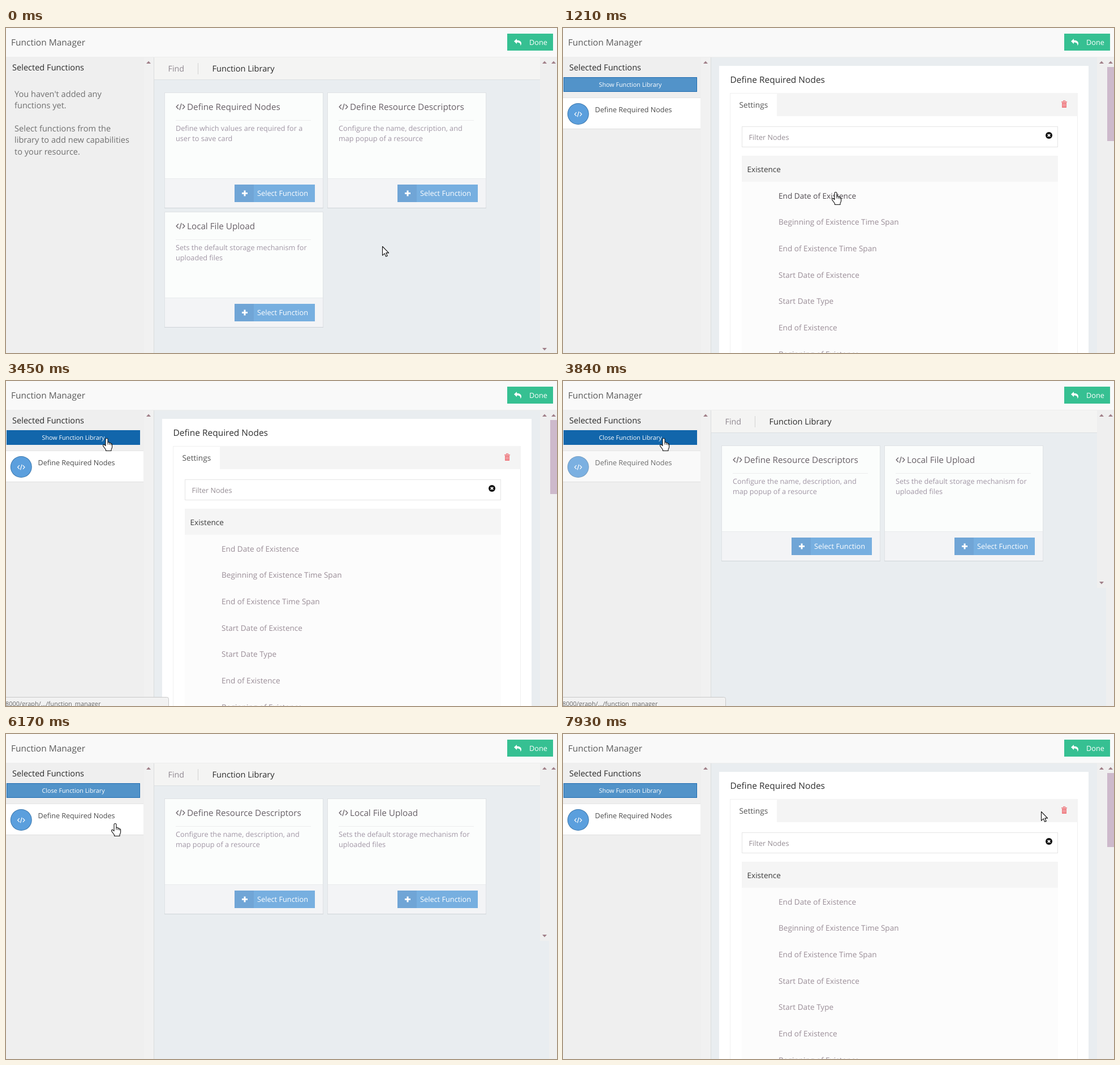
An HTML page with a canvas for the animation above (8000 ms loop, 974 by 575 pixels).

```html
<!DOCTYPE html>
<html lang="en">
<head>
<meta charset="utf-8">
<title>Function Manager</title>
<style>
html, body { margin: 0; width: 100%; height: 100%; overflow: hidden; background: #efefef; }
canvas { display: block; width: 974px; height: 575px; }
</style>
</head>
<body>
<canvas id="stage" width="974" height="575"></canvas>
<script>
const ctx = document.getElementById('stage').getContext('2d');
const LOOP = 8000;

const CARDS = {
  nodes: ['Define Required Nodes', 'Define which values are required for a', 'user to save card'],
  descriptors: ['Define Resource Descriptors', 'Configure the name, description, and', 'map popup of a resource'],
  upload: ['Local File Upload', 'Sets the default storage mechanism for', 'uploaded files']
};
const ROWS = ['End Date of Existence', 'Beginning of Existence Time Span', 'End of Existence Time Span',
  'Start Date of Existence', 'Start Date Type', 'End of Existence', 'Beginning of Existence'];

const linear = p => p;
const easeOut = p => 1 - (1 - p) ** 2;
const smooth = p => p * p * (3 - 2 * p);

// Pointer moves: first step, last step, number of steps, end point, easing
const MOVES = [
  [240, 820, 9, 482, 290, easeOut],
  [1890, 2107.5, 4, 265, 163, linear],
  [2180, 2470, 5, 212, 154, easeOut],
  [3090, 3240, 3, 178, 101, easeOut],
  [5210, 5730, 8, 251, 269, smooth],
  [5870, 6170, 5, 193, 158, easeOut],
  [7550, 7930, 6, 845, 137, smooth]
];

function pointerAt(t) {
  let x = 665, y = 386;
  for (const [from, to, n, ex, ey, ease] of MOVES) {
    if (t < from) break;
    const k = Math.min(n, Math.floor((t - from) * (n - 1) / (to - from) + 1e-6) + 1);
    const p = ease(k / n);
    x += (ex - x) * p;
    y += (ey - y) * p;
  }
  return { x: Math.round(x), y: Math.round(y) };
}

function rect(x, y, w, h, color) {
  ctx.fillStyle = color;
  ctx.fillRect(x, y, w, h);
}

function frame(x, y, w, h, color) {
  ctx.strokeStyle = color;
  ctx.lineWidth = 1;
  ctx.strokeRect(x + .5, y + .5, w - 1, h - 1);
}

function text(str, x, y, size, color) {
  ctx.font = `400 ${size}px "Open Sans", "Noto Sans", sans-serif`;
  ctx.fillStyle = color;
  ctx.fillText(str, x, y);
}

function poly(points, color) {
  ctx.beginPath();
  points.forEach(([x, y]) => ctx.lineTo(x, y));
  ctx.closePath();
  ctx.fillStyle = color;
  ctx.fill();
}

function disc(x, y, r, color) {
  ctx.beginPath();
  ctx.arc(x, y, r, 0, Math.PI * 2);
  ctx.fillStyle = color;
  ctx.fill();
}

function path(d, color, width) {
  ctx.strokeStyle = color;
  ctx.lineWidth = width;
  ctx.stroke(new Path2D(d));
}

function at(x, y, draw) {
  ctx.save();
  ctx.translate(x, y);
  draw();
  ctx.restore();
}

function codeIcon(x, y, color, scale) {
  at(x, y, () => {
    ctx.scale(scale, scale);
    path('M-3.6-4L-7.3 0L-3.6 4M3.6-4L7.3 0L3.6 4M1.6-5.6L-1.6 5.6', color, 1.4);
  });
}

function scrollArrow(x, y, dir) {
  poly([[x - 4, y + 2 * dir], [x + 4, y + 2 * dir], [x, y - 2.5 * dir]], '#a07f88');
}

const inside = (p, x, y, w, h) => p.x >= x && p.x < x + w && p.y >= y && p.y < y + h;

function card([title, line1, line2], x, y, p) {
  const hot = inside(p, x, y, 281, 205);
  rect(x, y, 281, 205, hot ? '#ffffff' : '#fbfdfc');
  rect(x, y + 152, 281, 53, '#f3f4f6');
  rect(x, y + 152, 281, 1, '#e8ebed');
  frame(x, y, 281, 205, hot ? '#a098b4' : '#dfe2e5');
  if (!hot) rect(x, y + 204, 281, 1, '#cfd4d8');
  codeIcon(x + 28.5, y + 25.5, hot ? '#444444' : '#6c656b', 1);
  text(title, x + 40, y + 31, 15.25, hot ? '#3c3c3c' : '#675f66');
  rect(x + 20, y + 49, hot ? 241 : 239, 1, '#ecedee');
  text(line1, x + 20, y + 68, 12.66, hot ? '#807a83' : '#a196a5');
  text(line2, x + 20, y + 85.5, 12.66, hot ? '#807a83' : '#a196a5');

  const bx = x + 124, by = y + 163;
  rect(bx, by, 142, 31, hot ? '#579ddb' : '#77afe0');
  rect(bx, by, 34, 31, hot ? '#4f90c9' : '#70a5d6');
  rect(bx + 13, by + 14, 10, 3, '#ffffff');
  rect(bx + 16.5, by + 10.5, 3, 10, '#ffffff');
  text('Select Function', bx + 40, by + 20, 12.75, '#ffffff');
}

function header() {
  rect(0, 0, 974, 52, '#f9f9f9');
  rect(0, 51, 974, 1, '#ededed');
  text('Function Manager', 9, 31, 15.5, '#5a5a5a');
  rect(886, 10, 81, 30, '#36c092');
  at(898, 19, () => {
    ctx.fillStyle = '#ffffff';
    ctx.fill(new Path2D('M0 4.5L5 0V2.7C10 2.7 13 4.5 13 8.5Q13 10.5 11.4 12.3C11.8 8 9.5 6.5 5 6.5V9.2Z'));
  });
  text('Done', 925, 29.5, 12.75, '#ffffff');
}

function sidebar(picked, library, p) {
  rect(0, 52, 244, 523, '#efefef');
  rect(244, 52, 17, 523, '#f1f1f1');
  rect(261, 52, 1, 523, '#dadcdd');
  scrollArrow(252, 61, 1);
  text('Selected Functions', 11, 75, 14.6, '#2b2b2b');
  if (!picked) {
    ["You haven't added any", 'functions yet.', '', 'Select functions from the',
      'library to add new capabilities', 'to your resource.']
      .forEach((line, i) => text(line, 15, 121.5 + i * 20.45, 14.6, '#707070'));
    return;
  }
  const over = inside(p, 1, 87, 236, 26);
  rect(1, 87, 236, 26, over ? '#1266ab' : '#5293c9');
  frame(1, 87, 236, 26, over ? '#1266ab' : '#1f6cb0');
  text((library ? 'Close' : 'Show') + ' Function Library', 63.5, 104, 10.75, '#ffffff');

  const active = !library || inside(p, 0, 124, 243, 55);
  rect(0, 123, 243, 56, active ? '#ffffff' : '#f9f9f9');
  rect(0, 123, 243, 1, '#e4e4e4');
  rect(0, 178, 243, 1, '#e0e0e0');
  disc(26.8, 152, 19, active ? '#3c78ad' : '#749dc2');
  disc(26.8, 152, 18, active ? '#5b9fdd' : '#7bb0e1');
  codeIcon(26.8, 152.5, '#ffffff', .85);
  text('Define Required Nodes', 56.5, 149, 12.6, active ? '#4b4b4b' : '#6c6c6c');
}

function libraryView(picked, p) {
  rect(262, 52, 682, 523, '#e9edf0');
  rect(262, 52, 682, 39, '#f4f4f3');
  rect(262, 91, 682, 1, '#dcdfe1');
  text('Find', 286.5, 77, 14.3, '#8f8890');
  rect(339, 62, 1, 20, '#d2d2d2');
  text('Function Library', 364.5, 77, 14.6, '#2b2b2b');
  rect(944, 52, 30, 523, '#efefef');
  scrollArrow(952, 61, 1);
  scrollArrow(968, 61, 1);
  if (picked) {
    rect(944, 366, 16, 209, '#e9edf0');
    scrollArrow(952, 357, -1);
    card(CARDS.descriptors, 280, 114, p);
    card(CARDS.upload, 568, 114, p);
  } else {
    scrollArrow(952, 568, -1);
    card(CARDS.nodes, 280, 114, p);
    card(CARDS.descriptors, 568, 114, p);
    card(CARDS.upload, 280, 325, p);
  }
}

function trash(x, y) {
  const red = '#ee7b80';
  rect(x, y + 2, 10, 1.5, red);
  frame(x + 3, y, 4, 3, red);
  rect(x + 1, y + 4, 8, 9, red);
  for (let i = 0; i < 3; i++) rect(x + 2.6 + i * 2, y + 5.5, .8, 5.5, '#f8c4c6');
}

function settingsView(p) {
  rect(262, 52, 682, 523, '#e9edf0');
  rect(944, 52, 30, 523, '#efefef');
  scrollArrow(952, 61, 1);
  scrollArrow(968, 61, 1);
  rect(962, 69, 12, 131, '#cdb9cb');
  rect(276, 67, 653, 508, '#ffffff');
  text('Define Required Nodes', 295.5, 97, 15.5, '#2f2f2f');
  rect(295, 115, 1, 460, '#f0f0f0');
  rect(909, 115, 1, 460, '#f0f0f0');
  rect(295, 115, 83, 1, '#f0f0f0');
  rect(378, 115, 532, 41, '#f4f4f4');
  text('Settings', 311.5, 141, 13.7, '#555555');
  trash(881, 128);

  frame(316, 174, 559, 37, '#e5e5e5');
  text('Filter Nodes', 328.5, 197.5, 12.65, '#958d94');
  disc(859, 190, 6, '#111111');
  path('M856.8 187.8L861.2 192.2M861.2 187.8L856.8 192.2', '#ffffff', 1.8);

  rect(316, 226, 559, 46, '#f5f5f5');
  text('Existence', 325.5, 255, 13.6, '#3a3a3a');
  rect(316, 272, 559, 303, '#fcfcfc');
  ROWS.forEach((name, i) => {
    const over = inside(p, 316, 273 + i * 46.7, 559, 46.7);
    text(name, 381, 301.5 + i * 46.7, 13.6, over ? '#504a50' : '#9a8d97');
  });
}

function status(t) {
  let alpha = 0, width = 288;
  if (t >= 1360 && t < 2325) alpha = t < 1430 || t >= 2253 ? .5 : 1;
  if (t >= 3400 && t < 5507) alpha = t < 3450 || t >= 5433 ? .5 : 1;
  if (!alpha) return;
  const full = t >= 4680 && t < 5507;
  if (full) width = Math.min(384, 320 + 32 * Math.floor((t - 4680) / 70));
  ctx.save();
  ctx.globalAlpha = alpha;
  ctx.beginPath();
  ctx.roundRect(-5, 559.5, width + 4.5, 25, 3);
  ctx.fillStyle = '#f2f2f2';
  ctx.fill();
  ctx.strokeStyle = '#c9c9c9';
  ctx.lineWidth = 1;
  ctx.stroke();
  ctx.clip();
  const id = full ? '2c7f40ab-93d1-11e8-b6e5-0f4a82d3c715' : '...';
  text(`8000/graph/${id}/function_manager`, -1, 575, 10.95, '#686868');
  ctx.restore();
}

function pointer(p, hand) {
  at(p.x, p.y, () => {
    const shape = new Path2D(hand
      ? 'M-2 2Q-2 .5 0 .5Q2 .5 2 2V7.5Q4.8 6.8 5 8.7Q7.4 8 7.7 10Q9.6 9.6 9.6 11.5V16Q9.4 18 8 20V22.5H-1.5V20.5L-6.2 14.2Q-7 11.3-4.6 11.4L-2 13.6Z'
      : 'M.5 .5V16.3L4.2 12.9L6.6 18.3L9.2 17.2L6.8 11.9H11.6Z');
    ctx.lineJoin = 'round';
    ctx.fillStyle = '#ffffff';
    ctx.fill(shape);
    ctx.strokeStyle = '#111111';
    ctx.lineWidth = 1.1;
    ctx.stroke(shape);
    if (hand) path('M2 7.5V11.5M5 8.7V12M7.7 10V12.5', '#111111', 1);
    ctx.lineJoin = 'miter';
  });
}

function draw(t) {
  const p = pointerAt(t);
  const picked = t >= 1210;
  const library = !picked || (t >= 3840 && t < 7010);
  ctx.textRendering = 'geometricPrecision';
  if (library) libraryView(picked, p); else settingsView(p);
  sidebar(picked, library, p);
  header();
  if (t >= 1140 && t < 1210) rect(280, 327, 299, 18, '#ffffff');
  status(t);
  const onSide = picked && (inside(p, 1, 87, 236, 26) || inside(p, 0, 124, 243, 55));
  const onButton = library && inside(p, 404, 277, 142, 31);
  const onRow = !library && inside(p, 316, 273, 559, 302);
  pointer(p, onSide || onButton || onRow);
}

const start = performance.now();
function tick() {
  draw((performance.now() - start) % LOOP);
  requestAnimationFrame(tick);
}
tick();
</script>
</body>
</html>
```
